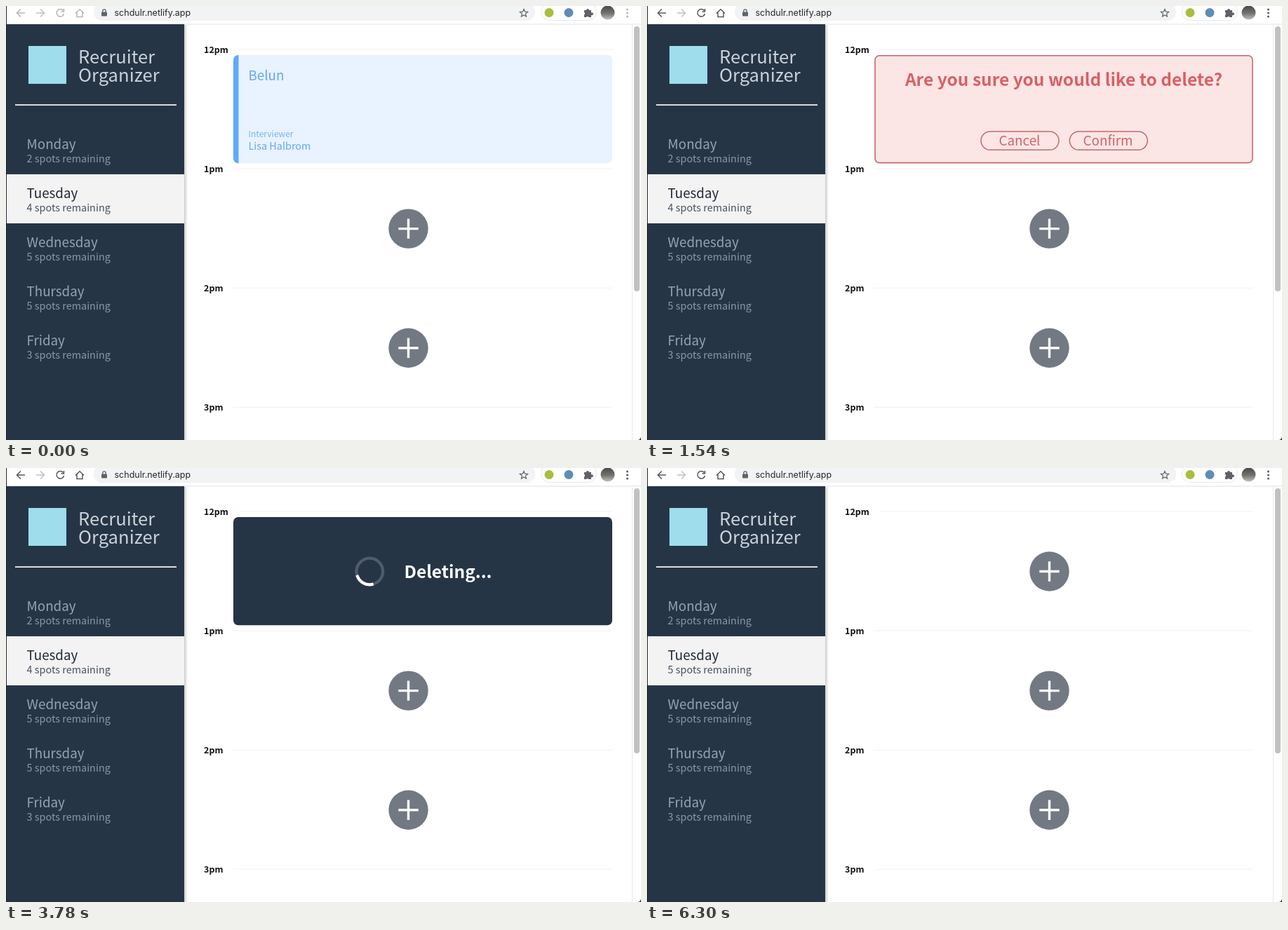
An HTML page that plays this animation: 905 by 619 pixels, repeating every 6370 ms.

```html
<!DOCTYPE html>
<html lang="en">
<head>
<meta charset="utf-8">
<title>Booking demo</title>
<style>
html, body { margin: 0; width: 100%; height: 100%; overflow: hidden; background: #fff; }
svg { display: block; width: 905px; height: 619px; }
text { font-family: "Noto Sans CJK JP", "Noto Sans CJK SC", "Noto Sans CJK", sans-serif; }
.icon { fill: none; stroke: #55585c; stroke-width: 1.5; }
.idle .icon { stroke: #b4b6b9; }
.dots { fill: #55585c; }
.idle .dots { fill: #b4b6b9; }
.icon.off { stroke: #bfc1c4; }
.brand { font-size: 25.6px; font-weight: 300; fill: #ccd2d9; }
.day { font-size: 18.8px; fill: #96a3b0; }
.spots { font-size: 14.45px; font-weight: 300; fill: #8a97a4; }
.picked .day { fill: #1f2833; }
.picked .spots { fill: #4a525c; }
.hour { font-size: 12.5px; font-weight: 700; fill: #111; }
.name, .button text { font-size: 18.8px; }
.role { font-size: 12px; font-weight: 300; opacity: .85; }
.host { font-size: 14.4px; font-weight: 500; }
.big { font-size: 24.45px; font-weight: 700; }
.button rect { fill: none; stroke: #c4686d; stroke-width: 1.5; }
.button text { fill: #d36266; text-anchor: middle; }
.button.hot rect { fill: #f35c5c; stroke: #f35c5c; }
.button.hot text { fill: #fff; font-weight: 500; }
</style>
</head>
<body>
<svg viewBox="0 0 905 619">
  <defs>
    <linearGradient id="shade">
      <stop stop-color="#000" stop-opacity=".2"/>
      <stop offset="1" stop-color="#000" stop-opacity="0"/>
    </linearGradient>
    <linearGradient id="photo" x2="0" y2="1">
      <stop stop-color="#46494c"/><stop offset=".55" stop-color="#74736f"/><stop offset="1" stop-color="#c5c1ba"/>
    </linearGradient>
    <clipPath id="cardClip"><rect x="324" y="70" width="540" height="154.300" rx="7"/></clipPath>
  </defs>

  <g id="bar">
    <path d="M0 26H905" stroke="#dfe1e4"/>
    <rect x="125" y="-4" width="629" height="25" rx="12" fill="#f1f3f4"/>
    <rect x="762.500" y="-4" width="79" height="24.500" rx="12" fill="none" stroke="#e6e8eb"/>
    <path class="icon" d="M27 10H16M21 4.500L15.500 10L21 15.500"/>
    <path class="icon off" d="M43 10H54M49 4.500L54.500 10L49 15.500"/>
    <path class="icon" d="M81.500 6.500A5.300 5.300 0 1 0 82.500 11M82.500 4V8H78.500"/>
    <path class="icon" d="M99 10.500L105 4.800L111 10.500M101 9V15.500H109V9"/>
    <rect x="136" y="8.500" width="8" height="6" rx="1" fill="#5f6368"/>
    <path d="M137.800 9V7A2.200 2.200 0 0 1 142.200 7V9" fill="none" stroke="#5f6368" stroke-width="1.300"/>
    <text x="154.500" y="14" style="font:12.5px Inter, sans-serif" fill="#26282b">schdulr.netlify.app</text>
    <path d="M738 4.500L739.600 8.200L743.600 8.500L740.500 11.100L741.500 15L738 12.900L734.500 15L735.500 11.100L732.400 8.500L736.400 8.200Z" fill="none" stroke="#5f6368" stroke-width="1.200"/>
    <circle cx="774" cy="9.500" r="6.500" fill="#a9bd3f"/>
    <circle cx="802" cy="9.500" r="6.500" fill="#5e8db5"/>
    <path d="M824 6H827A2 2 0 1 1 831 6H834V9.500A2 2 0 1 1 834 13V16H830.500A2 2 0 0 0 827 16H824V12.500A2 2 0 0 0 824 9Z" fill="#5f6368"/>
    <circle cx="857.500" cy="9.500" r="10" fill="url(#photo)"/>
    <g class="dots"><circle cx="885.500" cy="5" r="1.500"/><circle cx="885.500" cy="10" r="1.500"/><circle cx="885.500" cy="15" r="1.500"/></g>
  </g>

  <rect x="254" y="27" width="5" height="592" fill="url(#shade)"/>
  <path d="M.5 0V619" stroke="#20242a"/>
  <rect x="1" y="26" width="253" height="593" fill="#263546"/>
  <rect x="32" y="57" width="54" height="54" fill="#9fdcec"/>
  <text class="brand" x="103" y="82">Recruiter</text>
  <text class="brand" x="103" y="107.500">Organizer</text>
  <path d="M13 141.200H243" stroke="#f4f4f4" stroke-width="1.800"/>
  <g id="days"></g>

  <path d="M892.500 27V619" stroke="#e9e9e9"/>
  <rect x="895" y="29" width="8" height="378" rx="4" fill="#c1c1c1"/>
  <path d="M905 615V619H901Q904 618 905 615" fill="#33373b"/>
  <g id="hours"></g>

  <g id="show">
    <g clip-path="url(#cardClip)">
      <rect id="cardFill" x="324" y="70" width="540" height="155"/>
      <rect x="324" y="70" width="7.500" height="155" fill="#5faafd"/>
    </g>
    <g id="cardText">
      <text class="name" x="345.500" y="106">Belun</text>
      <text class="role" x="345.500" y="187">Interviewer</text>
      <text class="host" x="345.500" y="204.500">Lisa Halbrom</text>
    </g>
    <g id="tools" fill="none" stroke="#c3deff" stroke-width="2">
      <path d="M807 187.500H796.500Q794.800 187.500 794.800 189.200V203.500Q794.800 205.200 796.500 205.200H810.500Q812.200 205.200 812.200 203.500V196"/>
      <path d="M801 199L802 194.500L811.500 185L815.800 189.300L806 198.800ZM809 187.500L813.300 191.800"/>
      <path d="M824.500 188H843M830 188L831.500 185H836L837.500 188M826.500 188V203Q826.500 205.200 828.700 205.200H838.800Q841 205.200 841 203V188M830.500 191.500V201.500M833.800 191.500V201.500M837 191.500V201.500"/>
    </g>
  </g>

  <g id="ask">
    <rect x="325" y="70.800" width="538" height="152.800" rx="6" fill="#fce6e5" stroke="#c4686d" stroke-width="1.600"/>
    <text class="big" x="594" y="114" text-anchor="middle" fill="#d96064">Are you sure you would like to delete?</text>
    <g class="button"><rect x="476" y="178.900" width="111" height="26.400" rx="13.200"/><text x="531" y="199">Cancel</text></g>
    <g class="button" id="confirm"><rect x="602.300" y="178.900" width="111" height="26.400" rx="13.200"/><text x="657" y="199">Confirm</text></g>
  </g>

  <g id="busy">
    <rect x="324" y="70" width="540" height="154.300" rx="7" fill="#263546"/>
    <g fill="none" stroke-width="4.200">
      <circle cx="518.300" cy="147.500" r="18.800" stroke="#505c6a"/>
      <path id="arc" d="M531.600 134.200A18.800 18.800 0 0 1 531.600 160.800" stroke="#fff"/>
    </g>
    <text class="big" x="567.500" y="157" fill="#fff">Deleting...</text>
  </g>
</svg>
<script>
const $ = id => document.getElementById(id);
const LOOP = 6370;

const days = [["Monday", 2], ["Tuesday", 4], ["Wednesday", 5], ["Thursday", 5], ["Friday", 3]];
$("days").innerHTML = days.map(([name, n], i) => {
  const y = 170 + i * 70.1, on = i === 1;
  return `<g class="${on ? "picked" : ""}">
    ${on ? `<rect x="1" y="240" width="253" height="70" fill="#f3f3f4"/>` : ""}
    <text class="day" x="29.5" y="${y + 33.5}">${name}</text>
    <text class="spots" x="29.5" y="${y + 53}"><tspan>${n}</tspan> spots remaining</text></g>`;
}).join("");
const count = document.querySelector(".picked tspan");

$("hours").innerHTML = ["12pm", "1pm", "2pm", "3pm"].map((hour, i) => {
  const y = 62 + i * 170.1;
  return `<text class="hour" x="282" y="${y + 5}">${hour}</text>
    <path d="M${i ? 323 : 331} ${y}H864" stroke="#f1f1f1"/>
    <g id="add${i}"><circle cx="573.5" cy="${y + 85.5}" r="28.2" fill="#737982"/>
    <path d="M559.300 ${y + 85.500}h28.400m-14.200 -14.200v28.400" stroke="#fff" stroke-width="3.400"/></g>`;
}).join("");

const show = (id, on) => $(id).setAttribute("visibility", on ? "visible" : "hidden");

function draw(t) {
  const between = (a, b) => t >= a && t < b;
  const hover = between(210, 1470), done = t >= 4340;
  $("bar").classList.toggle("idle", t < 140);

  $("show").style.display = t < 1470 ? "" : "none";
  $("cardFill").setAttribute("fill", hover ? "#5faaff" : "#e9f2ff");
  $("cardText").setAttribute("fill", hover ? "#f0f6ff" : "#60a8f3");
  show("tools", hover);

  show("ask", between(1470, 3010));
  $("confirm").classList.toggle("hot", t >= 2310);

  show("busy", between(3010, 4340));
  $("arc").setAttribute("transform", `rotate(${118 + (t - 3780) / 1100 * 360} 518.3 147.5)`);

  show("add0", done);
  count.textContent = done ? 5 : 4;
  $("add1").querySelector("circle").setAttribute("fill", between(5250, 5600) ? "#5c6772" : "#737982");
}

function tick(now) {
  draw(now % LOOP);
  requestAnimationFrame(tick);
}
draw(0);
requestAnimationFrame(tick);
</script>
</body>
</html>
```
